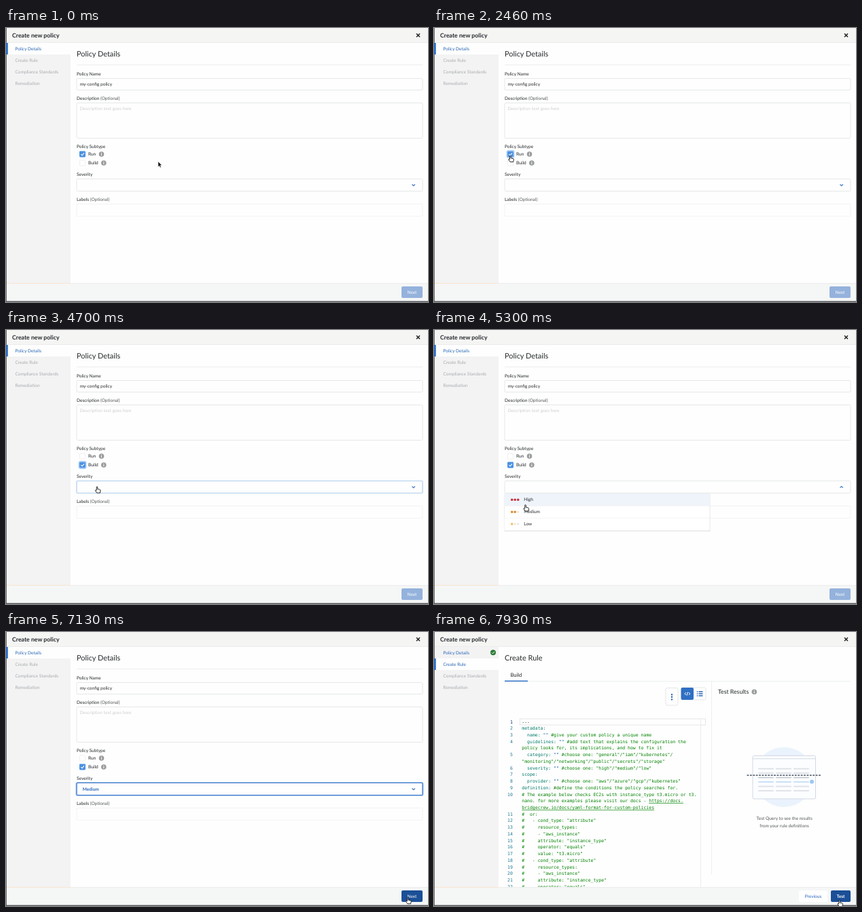
Recreate the animation shown at these times as an HTML page. Size 621 by 404 pixels, loop 8000 ms.

```html
<!DOCTYPE html>
<html lang="en">
<head>
<meta charset="utf-8">
<title>Create new policy</title>
<style>
html, body { margin: 0; width: 100%; height: 100%; overflow: hidden; background: #fdfdfd; }
svg { display: block; width: 100%; height: 100%; }
text { font: 6.55px Lato, sans-serif; fill: #25282c; text-rendering: geometricPrecision; white-space: pre; }
.h1 { font-size: 10.92px; }
.h2 { font-size: 8.73px; }
.tab { font-size: 7.64px; }
.bold { font-weight: 700; }
.mid { text-anchor: middle; }
.muted { fill: #a9abae; }
.faint { fill: #cdcfd1; }
.soft { fill: #55585c; }
.blue { fill: #2a66b8; }
.white { fill: #fff; }
.field { fill: #fefefe; stroke: #e6e7e8; }
.line { fill: none; stroke: #ededee; }
.stroke { fill: none; stroke: #3a72c4; stroke-width: 1.1; }
.ring { fill: none; stroke: #a9cdf5; stroke-width: 1.6; }
#editor text { font: 6.48px "DejaVu Sans Mono", monospace; fill: #008000; }
#editor .num { fill: #237893; text-anchor: end; }
#editor .now { fill: #0b216f; }
#editor .key { fill: #007a6c; }
#editor .str { fill: #0451a5; }
#editor .mark { fill: #222; }
#editor .link { text-decoration: underline; }
</style>
</head>
<body>
<svg viewBox="0 0 621 404">
  <defs>
    <g id="info">
      <circle r="3.8" fill="#9a9c9e"/>
      <path d="M0-.6V2M0-2.2v1" stroke="#fff" stroke-width="1.1"/>
    </g>
    <g id="checked">
      <rect width="9" height="9" rx="1.4" fill="#4b92e3"/>
      <path d="M2.3 4.6l1.7 1.7 3-3.5" fill="none" stroke="#fff" stroke-width="1.1"/>
    </g>
    <rect id="unchecked" x=".5" y=".5" width="8" height="8" rx="1.2" fill="#fff" stroke="#efefef"/>
    <rect id="focus" class="ring" x="-.6" y="-.6" width="10.2" height="10.2" rx="2"/>
    <clipPath id="pane"><rect x="100" y="120" width="305" height="256"/></clipPath>
  </defs>

  <!-- Dialog frame -->
  <rect width="621" height="404" fill="#fdfefd"/>
  <rect y="21" width="95" height="355" fill="#f3f3f4"/>
  <rect width="621" height="21.5" fill="#f5f5f4"/>
  <path class="line" d="M0 21.5H621"/>
  <rect y="376" width="621" height="27" fill="#f5f6f6"/>
  <path class="line" d="M95 376.5H621"/>
  <path d="M0 376.5H95" stroke="#f9e6d0"/>
  <text class="h2 bold" x="9" y="13.6">Create new policy</text>
  <path d="M604 8.2l5 5m0-5l-5 5" stroke="#222" stroke-width="1.5"/>

  <g data-on="0-7730">
    <rect y="22" width="95" height="17" fill="#fdfefd"/>
    <rect y="22" width="2.6" height="17" fill="#2f6fc4"/>
    <text class="muted" x="13.5" y="49.8">Create Rule</text>
  </g>
  <g data-on="7730-8000">
    <rect y="39" width="95" height="17" fill="#fdfefd"/>
    <rect y="39" width="2.6" height="17" fill="#2f6fc4"/>
    <text class="blue" x="13.5" y="49.8">Create Rule</text>
    <circle cx="87" cy="30.3" r="4" fill="#2b7a35"/>
    <path d="M85 30.4l1.5 1.5 2.6-3" fill="none" stroke="#fff"/>
  </g>
  <text class="blue" x="13.5" y="32.5">Policy Details</text>
  <text class="muted" x="13.5" y="67">Compliance Standards</text>
  <text class="muted" x="13.5" y="84.3">Remediation</text>

  <!-- Policy details -->
  <g data-on="0-7730">
    <text class="h1" x="104" y="42">Policy Details</text>
    <path class="line" d="M104 54.5H613"/>
    <text x="104" y="69.7">Policy Name</text>
    <rect class="field" x="104" y="74.5" width="509" height="17" rx="1.5"/>
    <text x="108.7" y="85">my-config policy</text>
    <text x="104" y="106.3">Description <tspan class="soft">(Optional)</tspan></text>
    <rect class="field" x="104" y="110.5" width="509" height="52" rx="1.5"/>
    <text class="faint" x="108.7" y="121.3">Description text goes here</text>

    <text x="104" y="177.3">Policy Subtype</text>
    <use href="#checked" x="108" y="181.5" data-on="0-2830"/>
    <use href="#unchecked" x="108" y="181.5" data-on="2830-7730"/>
    <use href="#focus" x="108" y="181.5" data-on="2330-3700"/>
    <text x="121" y="188.3">Run</text>
    <use href="#info" x="140.5" y="186"/>
    <use href="#unchecked" x="108" y="194.5" data-on="0-3700"/>
    <use href="#checked" x="108" y="194.5" data-on="3700-7730"/>
    <use href="#focus" x="108" y="194.5" data-on="3700-4900"/>
    <text x="121" y="201.2">Build</text>
    <use href="#info" x="143.8" y="199"/>

    <text x="104" y="218.4">Severity</text>
    <rect class="field" x="104" y="222.5" width="509" height="18" rx="1.5"/>
    <rect class="ring" x="104" y="222.5" width="509" height="18" rx="1.5" stroke-opacity=".6" data-on="4530-4960"/>
    <g data-on="6060-7730">
      <rect class="ring" x="103.5" y="222" width="510" height="19" rx="2" style="stroke-width:2.2"/>
      <rect class="stroke" x="104" y="222.5" width="509" height="18" rx="1.5"/>
      <text class="blue bold" x="112.7" y="233.5">Medium</text>
    </g>
    <path class="stroke" d="M597.5 230.5l2.2 2.2 2.2-2.2" data-on="0-4960"/>
    <path class="stroke" d="M597.5 232.7l2.2-2.2 2.2 2.2" data-on="4960-6060"/>
    <path class="stroke" d="M597.5 230.5l2.2 2.2 2.2-2.2" data-on="6060-7730"/>

    <text x="104" y="255.1">Labels <tspan class="soft">(Optional)</tspan></text>
    <rect class="field" x="104" y="259.5" width="509" height="18" rx="1.5" style="stroke:#f3f3f3"/>

    <g data-on="4960-6060">
      <rect x="103.5" y="241.5" width="303" height="55.5" fill="#000" opacity=".09"/>
      <rect x="104" y="241" width="301.5" height="54.5" fill="#fff"/>
      <rect x="104" y="241" width="301.5" height="18" fill="#eff4fb" data-on="4960-5600"/>
      <rect x="104" y="259" width="301.5" height="18" fill="#eff4fb" data-on="5600-6060"/>
      <path class="line" d="M104 259.3H405.5M104 277.3H405.5" stroke-width=".6"/>
      <g id="levels"></g>
    </g>

    <rect x="582" y="381" width="31" height="17" rx="2" fill="#94b2dc" data-on="0-6190"/>
    <rect x="582" y="381" width="31" height="17" rx="2" fill="#2f6fc4" data-on="6190-7060"/>
    <rect x="582" y="381" width="31" height="17" rx="2" fill="#1b4f97" data-on="7060-7730"/>
    <text class="white mid" x="597.5" y="391.8">Next</text>
  </g>

  <!-- Create rule -->
  <g data-on="7730-8000">
    <text class="h1" x="104" y="42">Create Rule</text>
    <path class="line" d="M104 72.8H613M408.5 73V357"/>
    <text class="tab" x="112.4" y="65.8">Build</text>
    <rect x="104" y="71.6" width="34" height="1.5" fill="#2f6fc4"/>

    <rect class="field" x="341" y="82.5" width="18" height="25.5" rx="2"/>
    <path d="M350 92.2v0m0 3.6v0m0 3.6v0" stroke="#2a66b8" stroke-width="2.4" stroke-linecap="round"/>
    <rect class="field" x="364" y="82" width="36" height="18" rx="2"/>
    <rect x="363.5" y="82" width="18.5" height="18" rx="2" fill="#2f6fc4"/>
    <path d="M370.8 89l-2 2 2 2m4-4l2 2-2 2m-1.3-4.6l-1.4 5.2" fill="none" stroke="#fff"/>
    <path d="M389.5 88h6m-6 3h6m-6 3h6M386.8 88h1.4m-1.4 3h1.4m-1.4 3h1.4" stroke="#2a66b8" stroke-width="1.3"/>

    <text class="h2" x="418" y="91.2">Test Results</text>
    <use href="#info" x="471.3" y="88.3"/>
    <circle cx="515" cy="214" r="44" fill="#eaf3fd"/>
    <rect x="469" y="182.5" width="92.5" height="63.5" rx="2" fill="#fbfdff" stroke="#d3d9e3"/>
    <path d="M469 186.8h92.5" stroke="#d3d9e3"/>
    <g id="bars"></g>
    <path d="M460.5 211.3H570" stroke="#4d5562" stroke-width="1.4" stroke-dasharray="2.8 1.6"/>
    <circle cx="556" cy="220.7" r="3" fill="#9cc8f2"/>
    <text class="soft mid" x="515.7" y="276.8">Test Query to see the results</text>
    <text class="soft mid" x="515.5" y="287.6">from your rule definitions</text>

    <g id="editor" clip-path="url(#pane)" data-on="7900-8000">
      <rect x="126.5" y="128" width="273" height="9" fill="none" stroke="#e6e6e6"/>
      <path class="line" d="M392.5 128V376"/>
    </g>

    <rect x="537" y="381" width="42" height="17" rx="2" fill="#fff"/>
    <text class="blue mid" x="558" y="391.8">Previous</text>
    <rect x="584" y="381" width="29" height="17" rx="2" fill="#1b4f97"/>
    <text class="white bold mid" x="598.5" y="391.8">Test</text>
  </g>

  <rect width=".9" height="404" fill="#55585b"/>
  <rect y="402.6" width="621" height="1.4" fill="#55585b"/>
  <rect y="22" width="2.6" height="17" fill="#2f6fc4" data-on="0-7730"/>
  <rect y="39" width="2.6" height="17" fill="#2f6fc4" data-on="7730-8000"/>

  <!-- Pointer shapes, hot spot at 0,0 -->
  <g id="pointer">
    <path id="arrow" d="M0 0V8l1.8-1.6 1.3 2.8 1.4-.7L3.300 5.800H5.700Z" fill="#111" stroke="#fff" stroke-width=".6"/>
    <path id="hand" d="M-.8.4Q0-.6.8.4V3.600l3 .6q1.400.4 1.200 1.800L4.400 9.200H-.3L-2.700 5.600q.3-1.300 1.900-.2Z" fill="#fff" stroke="#111" stroke-width=".9"/>
    <path id="beam" d="M-1.700-4.500Q0-4.500 0-3.500Q0-4.500 1.700-4.500M0-3.500V3.500M-1.700 4.500Q0 4.500 0 3.500Q0 4.500 1.700 4.500" fill="none" stroke="#222"/>
  </g>
</svg>

<script>
const LOOP = 8000;
const $ = id => document.getElementById(id);

// Severity options: name and how many dots are lit
const levels = [['High', 3, '#c42f3c'], ['Medium', 2, '#d98b2b'], ['Low', 1, '#f3bf56']];
$('levels').innerHTML = levels.map(([name, lit, color], row) => {
  const y = 250.3 + row * 17.9;
  const dots = [0, 1, 2].map(i =>
    `<circle cx="${114.7 + i * 4.5}" cy="${y}" r="1.75" fill="${i < lit ? color : '#ece9e2'}"/>`);
  return dots.join('') + `<text x="132.300" y="${y + 2.1}">${name}</text>`;
}).join('');

// Result table in the illustration
const barColors = ['#dcdfe5', '#dcdfe5', '#c6c9ce', '#c3dcf7', '#dcdfe5', '#dcdfe5'];
$('bars').innerHTML = barColors.map((color, row) => [477, 503, 529].map(x =>
  `<rect x="${x}" y="${200.700 + row * 6.5}" width="23" height="1.8" rx=".8" fill="${color}"/>`).join('')).join('');

// A leading ">" marks the wrapped rest of a comment
const source = `---
metadata:
  name: "" #give your custom policy a unique name
  guidelines: "" #add text that explains the configuration the
>policy looks for, its implications, and how to fix it
  category: "" #choose one: "general"/"iam"/"kubernetes"/
>"monitoring"/"networking"/"public"/"secrets"/"storage"
  severity: "" #choose one: "high"/"medium"/"low"
scope:
  provider: "" #choose one: "aws"/"azure"/"gcp"/"kubernetes"
definition: #define the conditions the policy searches for.
# The example below checks EC2s with instance_type t3.micro or t3.
>nano. for more examples please visit our docs - https:\/\/docs.
>bridgecrew.io/docs/yaml-format-for-custom-policies
#  or:
#   - cond_type: "attribute"
#     resource_types:
#     - "aws_instance"
#     attribute: "instance_type"
#     operator: "equals"
#     value: "t3.micro"
#   - cond_type: "attribute"
#     resource_types:
#     - "aws_instance"
#     attribute: "instance_type"
#     operator: "equals"`;

const span = kind => text => `<tspan class="${kind}">${text}</tspan>`;
function highlight(line) {
  if (line[0] === '>') return line.slice(1).replace(/https:.*|^bridgecrew.*/, span('link'));
  const [, code, comment] = line.match(/^([^#]*)(.*)$/);
  const painted = code.replace(/---|\w+:|""/g, part =>
    span(part === '---' ? 'mark' : part === '""' ? 'str' : 'key')(part));
  return painted + comment;
}

let number = 0;
$('editor').innerHTML += source.split('\n').map((line, row) => {
  const y = 134.5 + row * 9.73;
  const label = line[0] === '>' ? '' : ++number;
  return `<text class="num ${row ? '' : 'now'}" x="115.800" y="${y}">${label}</text>` +
    `<text x="129.300" y="${y}">${highlight(line)}</text>`;
}).join('');

// Pointer stops: time, x, y
const stops = [
  [0, 223.8, 196.8], [200, 223.8, 196.8], [1000, 112.3, 188.2], [3070, 112.3, 188.2],
  [3300, 112.3, 200.5], [4040, 112.3, 200.5], [4100, 116, 205.5], [4700, 134, 231],
  [4960, 134, 231], [5300, 134.5, 257.8], [5460, 134.5, 257.8], [5800, 134.6, 264.5],
  [6400, 134.6, 264.5], [6600, 526, 343], [6790, 526, 343], [7200, 596.5, 395.5], [LOOP, 596.5, 395.5],
];
const shapes = [[0, 'arrow'], [870, 'hand'], [4060, 'arrow'], [4530, 'hand'],
  [6390, 'beam'], [6450, 'arrow'], [7060, 'hand']];

const timed = [...document.querySelectorAll('[data-on]')].map(node => {
  const [from, to] = node.dataset.on.split('-').map(Number);
  return { node, from, to };
});

function pointerAt(t) {
  const next = stops.findIndex(stop => stop[0] > t);
  const [t0, x0, y0] = stops[next - 1], [t1, x1, y1] = stops[next];
  const p = (t - t0) / (t1 - t0), ease = p * p * (3 - 2 * p);
  return [x0 + (x1 - x0) * ease, y0 + (y1 - y0) * ease];
}

function draw() {
  const t = performance.now() % LOOP;
  for (const { node, from, to } of timed) node.style.display = t >= from && t < to ? '' : 'none';
  $('pointer').setAttribute('transform', `translate(${pointerAt(t)})`);
  const shape = shapes.filter(([from]) => from <= t).pop()[1];
  for (const id of ['arrow', 'hand', 'beam']) $(id).style.display = id === shape ? '' : 'none';
  requestAnimationFrame(draw);
}
draw();
</script>
</body>
</html>
```
